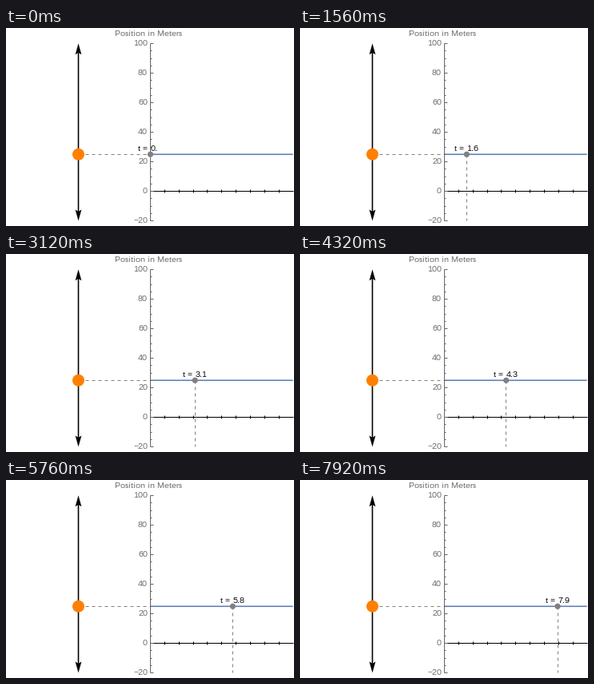
Write a matplotlib script that moves like this. It is 360 by 248 pixels and loops after 8000 ms.

```python
import matplotlib.pyplot as plt
from matplotlib.animation import FuncAnimation
from matplotlib.patches import Circle, Polygon

W, H, DPI = 360, 248, 100
TICK_MS, STEP_MS, LOOP_MS = 40, 120, 8000
POSITION = 25
X0, X_UNIT = 180, 17.87
Y0, Y_UNIT = 204, 1.85
LEFT_X = 90.5
BLUE, ORANGE = "#5E81B5", "#FF8000"
GRAY, AXIS = "#808080", "#666666"

plt.rcParams.update({
    "font.family": "Liberation Sans",
    "text.hinting": "native",
    "text.hinting_factor": 1,
})


def px(t):
    return X0 + X_UNIT * t


def py(v):
    return Y0 - Y_UNIT * v


def pt(pixels):
    return pixels * 72 / DPI


fig = plt.figure(figsize=(W / DPI, H / DPI), dpi=DPI, facecolor="white")
ax = fig.add_axes([0, 0, 1, 1])
ax.set_xlim(0, W)
ax.set_ylim(H, 0)
ax.axis("off")


def line(x, y, color, width=1.0, z=1, **kw):
    return ax.plot(x, y, color=color, lw=pt(width), zorder=z,
                   solid_capstyle="butt", **kw)[0]


def label(x, y, s, color, ha="left", size=10, z=8):
    return ax.text(x, y, s, color=color, fontsize=pt(size), ha=ha,
                   va="baseline", zorder=z)


def arrow_head(tip, direction):
    back, notch = tip + 14 * direction, tip + 11.5 * direction
    ax.add_patch(Polygon([(LEFT_X, tip), (LEFT_X - 3.9, back),
                          (LEFT_X, notch), (LEFT_X + 3.9, back)],
                         fc="black", lw=0, zorder=4))


def disc(x, y, radius, color):
    return ax.add_patch(Circle((x, y), radius, fc=color, lw=0, zorder=6))


top, bottom, mid = py(100), py(-20), py(POSITION)
center_y = mid + 0.5  # lines snap to pixel centres, discs do not

# Vertical track with the moving body
line([LEFT_X] * 2, [top + 8, bottom - 8], "black", 1.6, 3, snap=False)
arrow_head(top + 0.3, 1)
arrow_head(bottom + 0.5, -1)
disc(LEFT_X, center_y, 7.5, ORANGE)

# Time axis
line([X0, px(10)], [Y0, Y0], "black", 1, 3)
for i in range(1, 10):
    line([px(i)] * 2, [Y0 - 2, Y0 + 2], "black", 1, 3)

# Position axis
line([X0, X0], [top, bottom], AXIS, 1, 4)
for v in range(-20, 101, 5):
    major = v % 20 == 0
    line([X0, X0 + (4 if major else 2)], [py(v)] * 2, AXIS, 1, 4)
    if major:
        label(177, round(py(v)) + 3, str(v).replace("-", "\u2212"), AXIS, "right")
label(178.5, 10, "Position in Meters", AXIS, "center")

# Graph, guides and marker
line([X0, px(10)], [center_y] * 2, BLUE, 1.6, 2.5, snap=False)
dash = {"dashes": (4, 4), "dash_capstyle": "butt"}
guide_h = line([], [], GRAY, 1, 2, **dash)
guide_v = line([], [], GRAY, 1, 2, **dash)
dot = disc(X0, center_y, 3.6, GRAY)
name = label(0, 154, "t =", "black")
value = label(0, 154, "", "black")


def update(i):
    t = i * TICK_MS // STEP_MS * STEP_MS / 1000
    x = px(t)
    guide_h.set_data([LEFT_X, x], [mid, mid])
    guide_v.set_data([x, x], [mid, bottom])
    dot.center = (x + 0.5, center_y)
    name.set_x(x - 15)
    value.set_x(x + 0.6)
    value.set_text(f"{t:.1f}".rstrip("0") if t else "0.")
    return guide_h, guide_v, dot, name, value


anim = FuncAnimation(fig, update, frames=LOOP_MS // TICK_MS,
                     interval=TICK_MS, repeat=True, repeat_delay=0)
plt.show()
```
